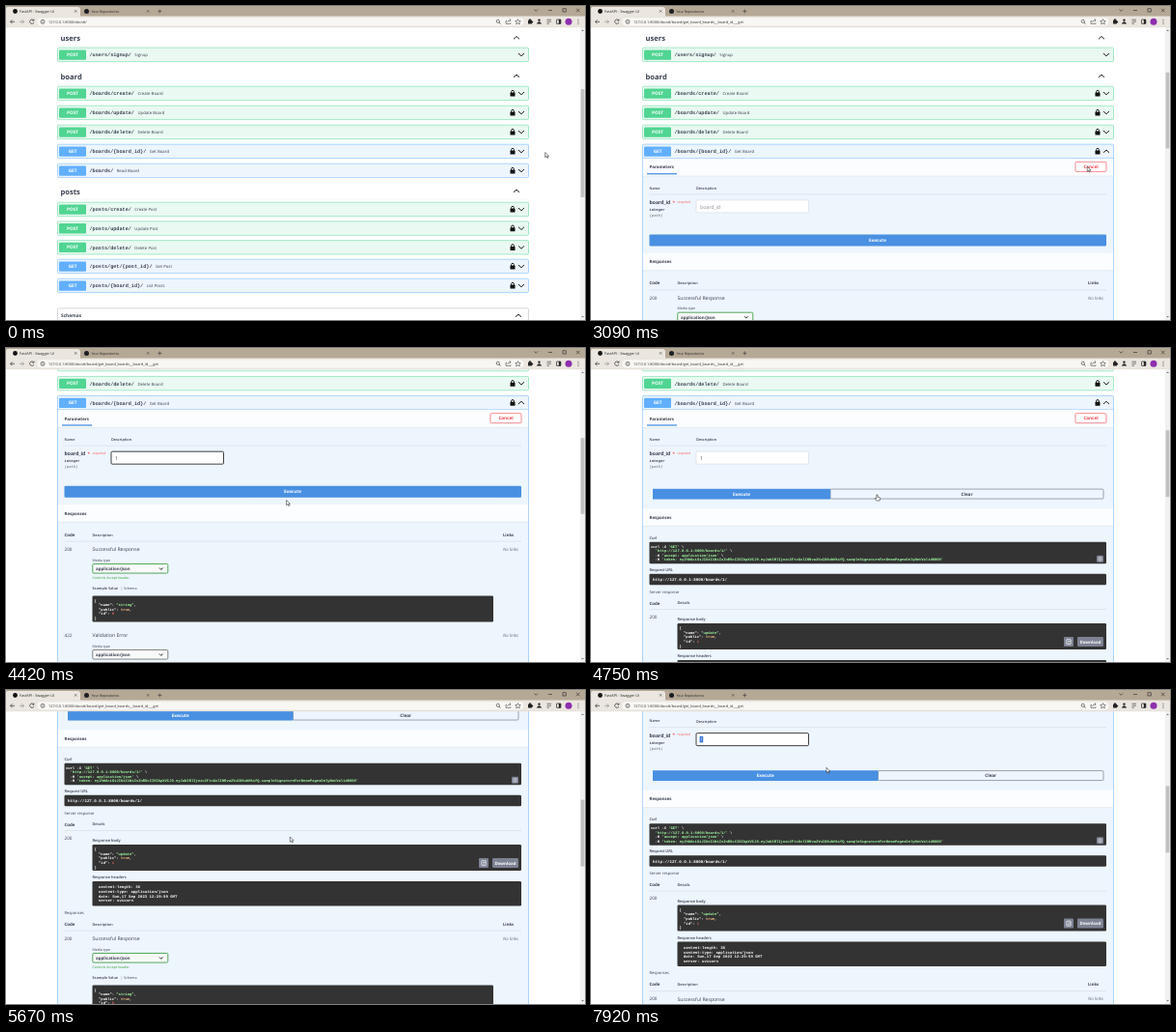
These frames come from a looping animation (600x325 px, 8000 ms). An HTML page:

```html
<!DOCTYPE html>
<html lang="en">
<head>
<meta charset="utf-8">
<title>API docs walkthrough</title>
<style>
  html, body { margin: 0; width: 100%; height: 100%; overflow: hidden; background: #fff; }
  svg { display: block; width: 600px; height: 325px; }
  text { font-family: "Open Sans", sans-serif; fill: #3b4151; text-rendering: geometricPrecision; white-space: pre; }
  .b { font-weight: 700; }
  .s { font-weight: 600; }
  .i { font-style: italic; }
  .m { font-family: "Liberation Mono", monospace; }
  .c { text-anchor: middle; }
  .w { fill: #fff; }
</style>
</head>
<body>
<svg id="stage" viewBox="0 0 600 325" xmlns="http://www.w3.org/2000/svg"></svg>
<script>
const LOOP = 8000;
const GREEN = '#50d592', BLUE = '#61affe', PANEL = '#edf5fd', INK = '#3b4151', DARK = '#333', BUTTON = '#4990e2';
const OPENED = 1750, TRYING = 3000, EXECUTED = 4635;

// Drawing helpers; text is placed by its vertical centre.
const text = (x, y, str, size, cls = '', fill = '') =>
  `<text x="${x}" y="${y + size * 0.36}" font-size="${size}" class="${cls}"${fill && ` style="fill:${fill}"`}>${str}</text>`;
const rect = (x, y, w, h, fill, stroke = 'none', r = 0, sw = 0.7) =>
  `<rect x="${x}" y="${y}" width="${w}" height="${h}" rx="${r}" fill="${fill}" stroke="${stroke}" stroke-width="${sw}"/>`;
const line = (d, stroke = INK, sw = 0.8) => `<path d="${d}" fill="none" stroke="${stroke}" stroke-width="${sw}"/>`;
const circle = (x, y, r, fill, stroke = 'none') =>
  `<circle cx="${x}" cy="${y}" r="${r}" fill="${fill}" stroke="${stroke}" stroke-width=".7"/>`;
const group = (id, body) => `<g id="${id}">${body}</g>`;
const named = (id, markup) => markup.replace(/^<(\w+)/, `<$1 id="${id}"`);
const rule = y => line(`M60.5 ${y}H534`, '#cdd4dc', 0.5);
const chevron = (x, y, up) => line(`M${x - 3} ${y + (up ? 1.4 : -1.4)}l3 ${up ? -2.8 : 2.8} 3 ${up ? 2.8 : -2.8}`, '#222', 1);
const tint = (color, str) => `<tspan style="fill:${color}">${str}</tspan>`;
const quoted = s => tint('#a2fca2', s);

function section(y, name) {
  return text(56.5, y, name, 7.6, 'b') + line(`M53 ${y + 8}H542`, '#eceef0', 0.5) + chevron(529, y - 0.5, true);
}

function summary(y, method, path, label, { lock = true, up = false } = {}) {
  const lockIcon = rect(522.5, y - 0.8, 5, 4, '#111', 'none', 0.6) + line(`M523.6 ${y - 0.5}v-1.2a1.4 1.4 0 0 1 2.8 0v1.2`, '#111', 0.9);
  return rect(55, y - 5, 28, 10.3, method === 'GET' ? BLUE : GREEN, 'none', 1)
    + text(69, y, method, 4.7, 'b c w')
    + text(86.5, y, path, 5.17, 'm s')
    + text(86.5 + path.length * 3.1 + 3.4, y + 0.5, label, 4.3)
    + (lock ? lockIcon : '') + chevron(534, y, up);
}

function row(y, method, path, label, options) {
  const get = method === 'GET';
  return rect(53.5, y - 7.2, 488, 14.4, get ? PANEL : '#eaf9f2', get ? BLUE : GREEN, 1.2, 0.5)
    + summary(y, method, path, label, options);
}

function band(y, label) {
  return rect(53.9, y - 9, 487.2, 18, '#fbfdff') + line(`M53.9 ${y + 9.2}H541.1`, '#d9e2ea', 0.6) + text(60.5, y, label, 4.4, 'b');
}

function button(x, y, w, label, stroke, color = stroke) {
  return rect(x, y - 5, w, 10, '#fff', stroke, 1.2, 0.6) + text(x + w / 2, y, label, 4.6, 'b c', color);
}

function copyIcon(x, y, s) {
  return rect(x, y, s, s, '#7d8293', 'none', 1)
    + `<g transform="translate(${x} ${y}) scale(${s / 10})">` + rect(2.8, 2.6, 4.4, 5, 'none', '#fff', 0.4) + line('M4 4.4H7M4 6H6', '#fff', 0.6) + '</g>';
}

const lines = (x, y, step, size, rows) =>
  rows.map(([dx, s], i) => text(x + dx, y + i * step, s, size, 'm b w')).join('');

function jsonLines(y, value, last) {
  return lines(91.5, y, 4.6, 3.8, [
    [0, '{'], [4.6, `"name": ${quoted(`"${value}"`)},`], [4.6, `"public": ${tint('#fcc28c', 'true')},`],
    [4.6, `"id": ${tint('#d36363', last)}`], [0, '}']]);
}

function pageTop() {
  return section(33, 'users')
    + row(50, 'POST', '/users/signup/', 'Signup', { lock: false })
    + section(72.5, 'board')
    + ['Create', 'Update', 'Delete'].map((verb, i) =>
        row(90 + i * 20, 'POST', `/boards/${verb.toLowerCase()}/`, `${verb} Board`)).join('');
}

function closedList() {
  return row(150, 'GET', '/boards/{board_id}/', 'Get Board')
    + row(170, 'GET', '/boards/', 'Read Board')
    + section(191.5, 'posts')
    + ['Create', 'Update', 'Delete'].map((verb, i) =>
        row(210 + i * 19.7, 'POST', `/posts/${verb.toLowerCase()}/`, `${verb} Post`)).join('')
    + row(269, 'GET', '/posts/get/{post_id}/', 'Get Post')
    + row(289, 'GET', '/posts/{board_id}/', 'List Posts')
    + rect(53.5, 312.5, 488, 30, '#fff', '#c4c6ca', 1.2)
    + text(57, 320, 'Schemas', 4.8, 'b') + chevron(531, 320, true);
}

function parameters() {
  return rect(53.5, 142.7, 488, 700, PANEL, BLUE, 1.2, 0.5)
    + summary(150, 'GET', '/boards/{board_id}/', 'Get Board', { up: true })
    + line('M53.5 157.2H541.5', BLUE, 0.5)
    + group('hoverCopy', copyIcon(508, 145.8, 8.5))
    + band(166.5, 'Parameters') + line('M58 173.3H89', BUTTON, 1.3)
    + group('tryButton', button(496, 166, 38, 'Try it out', '#8b8e97', INK))
    + group('cancelButton', button(502, 166, 32, 'Cancel', '#f0404a'))
    + text(60.5, 188, 'Name', 3.75, 's') + text(109, 188, 'Description', 3.8, 's') + rule(194.5)
    + text(60.5, 203, 'board_id', 5.1, 'b') + text(84.5, 202.5, '*', 4.5, '', '#f00') + text(89.5, 202, 'required', 3.4, '', '#f55')
    + text(60.5, 210, 'integer', 3.8, 'm b') + text(60.5, 216, '(path)', 3.9, 'm i', '#666')
    + '<rect id="field" x="109" y="200.5" width="116.5" height="13" rx="1.2"/>'
    + group('selection', rect(112.6, 203.8, 3.6, 6.4, '#3573d9'))
    + named('placeholder', text(113, 207.3, 'board_id', 5.2, '', '#8b8f98'))
    + named('typed', text(113, 207.3, '1', 5.2))
    + group('caret', line('M113 204V210.5', '#111', 0.5));
}

function response(y, code, label, selectStroke) {
  return text(60.5, y, code, 4.6) + text(89.5, y + 0.3, label, 5.1) + text(515, y, 'No links', 4.5, 'i', '#666b77')
    + text(89.5, y + 11.2, 'Media type', 3.6)
    + rect(89.8, y + 15.3, 78, 9.6, '#f9fafa', selectStroke, 1.2, 0.9) + text(93, y + 20.2, 'application/json', 4.4, 'b')
    + line(`M159 ${y + 19.4}l1.8 1.8 1.8-1.8`, '#111', 0.9);
}

function example(y) {
  return text(89.5, y, 'Example Value', 3.75, 's') + line(`M119.7 ${y - 2.2}v4.5`, '#aaa', 0.4) + text(122, y, 'Schema', 3.7)
    + rect(89.5, y + 7.6, 415.5, 27, DARK, 'none', 1.2);
}

function responseTable() {
  return text(60.5, 274, 'Code', 4.4, 'b') + text(89.5, 274.2, 'Description', 3.8, 's') + text(515, 274, 'Links', 4.2, 'b')
    + rule(281)
    + response(289, '200', 'Successful Response', '#41a047')
    + text(89.5, 318.8, 'Controls Accept header.', 3.5, '', '#2f9e2f')
    + example(329.7) + jsonLines(342, 'string', '0')
    + response(378, '422', 'Validation Error', '#777') + example(412);
}

function result() {
  const token = 'eyJhbGciOiJIUzI1NiIsInR5cCI6IkpXVCJ9.' + 'eyJub3RlIjoic2FtcGxlIHRva2VuIG9ubHkifQ.' + 'sampleSignatureForDemoPagesOnlyNotValid0000';
  return named('clearBox', rect(64, 241, 467, 10, 'none', '#666b77', 1.2, 0.6))
    + named('clearText', text(388, 246, 'Clear', 4.6, 'b c'))
    + named('runBox', rect(64, 240.7, 183, 10.8, BUTTON))
    + named('runText', text(155, 246, 'Execute', 4.6, 'b c w'))
    + band(270, 'Responses')
    + text(60.5, 291.3, 'Curl', 4, 's') + rect(60.5, 295.6, 473.5, 22.6, DARK, 'none', 1.2)
    + lines(62, 300.3, 4.55, 3.8, [
        [0, `curl -X ${quoted("'GET'")} \\`],
        [4.6, `${quoted("'http://127.0.0.1:8000/boards/1/'")} \\`],
        [4.6, `-H ${quoted("'accept: application/json'")} \\`],
        [4.6, `-H ${quoted(`'token: ${token}'`)}`]])
    + copyIcon(524, 309.7, 7)
    + text(60.5, 324.3, 'Request URL', 4, 's') + rect(60.5, 328.8, 473.5, 11.4, DARK, 'none', 1.2)
    + text(64, 334.5, 'http://127.0.0.1:8000/boards/1/', 4.15, 'm b w')
    + text(60.5, 347, 'Server response', 4.1)
    + text(60.5, 359, 'Code', 4.4, 'b') + text(89.5, 359, 'Details', 3.9, 's') + rule(365.5)
    + text(60.5, 373, '200', 4.6) + text(89.5, 376, 'Response body', 4, 's')
    + rect(89.5, 380, 444.5, 27, DARK, 'none', 1.2) + jsonLines(384.8, 'update', '1')
    + copyIcon(490, 394, 10) + rect(504, 394, 27, 10, '#7d8293', 'none', 1.2) + text(517.5, 399, 'Download', 4.4, 'b c w')
    + text(89.5, 413.8, 'Response headers', 4, 's') + rect(89.5, 418, 444.5, 25.4, DARK, 'none', 1.2)
    + lines(95.8, 424, 4.55, 4, ['content-length: 38', 'content-type: application/json',
        'date: Sun,17 Sep 2023 12:29:59 GMT', 'server: uvicorn'].map(s => [0, s]))
    + text(60.5, 450.4, 'Responses', 4.1);
}

function browserBar() {
  const ink = '#454545', bar = '#ebe6df';
  return rect(0, 0, 600, 11, '#b5a895')
    + `<path d="M0 11V2.5Q0 1 2 1H74Q77 1 77 4V11Z" fill="${bar}"/>` + rect(0, 10.5, 600, 11.5, bar)
    + circle(9.5, 5.5, 2.4, '#111') + text(14, 5.5, 'FastAPI - Swagger UI', 3.8, '', '#222') + line('M71 4.2l2.4 2.4m0-2.4l-2.4 2.4', ink, 0.6)
    + circle(83.5, 5.5, 2.5, '#1b1f23') + text(88.5, 5.5, 'Your Repositories', 3.5, '', '#222') + line('M146 4.2l2.4 2.4m0-2.4l-2.4 2.4', ink, 0.6)
    + line('M157.3 5.4h4M159.3 3.4v4', ink, 0.7)
    + line('M547.5 3.5l1.8 1.8 1.8-1.8M562 4.5h4M591 2.8l3.4 3.4m0-3.4l-3.4 3.4', '#222', 0.6) + rect(577, 2.8, 3.2, 3.2, 'none', '#222', 0, 0.6)
    + line('M9 16.3H4.5m2-2l-2 2 2 2', ink) + line('M14 16.3h4.5m-2-2l2 2-2 2', '#999')
    + line('M28.6 14.8a2.2 2.2 0 1 0 .3 2.2M29 13.6v1.6h-1.7', ink)
    + rect(32.5, 12.2, 504, 8.2, '#f9f7f4', 'none', 4.1)
    + circle(38, 16.3, 2, 'none', ink) + line('M38 16v1.4M38 14.9v.6', ink, 0.6)
    + named('address', text(44, 16.2, '', 3.85, '', '#333'))
    + circle(509.8, 15.8, 1.6, 'none', ink) + line('M511 17l1.5 1.5', ink)
    + line('M519 15.2h-1v3.2h5v-1M519.5 17q.5-2.4 3.5-2.4m-1.2-1.3l1.4 1.3-1.4 1.3', ink, 0.6)
    + line('M530.5 13.6l.8 1.8 2 .2-1.5 1.3.5 2-1.8-1.1-1.8 1.1.5-2-1.5-1.3 2-.2z', ink, 0.6)
    + rect(541, 14.6, 4, 4, '#222', 'none', 0.6) + circle(543, 14.3, 1, '#222') + circle(545.2, 16.6, 1, '#222')
    + circle(552.5, 14.6, 1.2, '#222') + '<path d="M549.8 18.6q2.7-4.6 5.4 0z" fill="#222"/>'
    + line('M560.5 14.2h4.5M560.5 16.2h4.5M560.5 18.2h2.5', ink, 0.7)
    + rect(570.5, 14, 4.4, 4.4, 'none', '#222', 0.4) + rect(572.8, 14, 2.1, 4.4, '#222')
    + circle(583, 16.3, 3.5, '#8e2fae')
    + [14.3, 16.3, 18.3].map(y => circle(593, y, 0.55, ink)).join('')
    + line('M0 21.8H600', '#dcd8d2', 0.5);
}

const scrollbar = rect(595, 22, 5, 303, '#f1f1f1') + '<rect id="thumb" x="595.6" width="3.8" fill="#c1c1c1"/>'
  + '<path d="M596.2 26l1.4-1.6 1.4 1.6zM596.2 321l1.4 1.6 1.4-1.6z" fill="#777"/>';

const pointers = group('arrow', '<path d="M0 0V5.2L1.3 4.1 2.2 6 3 5.6 2.2 3.8H3.8Z" fill="#fff" stroke="#111" stroke-width=".5"/>')
  + group('hand', '<path d="M-.6 0Q0-.6.6 0V2.2L2.8 2.8Q3.3 3 3.1 4L2.6 6H-.6L-2.2 3.6Q-1.6 2.8-.6 3.6Z" fill="#fff" stroke="#111" stroke-width=".5"/>')
  + group('beam', line('M-1-2.5h2M0-2.5v5M-1 2.5h2', '#111', 0.5));

document.getElementById('stage').innerHTML = rect(0, 0, 600, 325, '#fff')
  + group('page', pageTop() + group('closed', closedList())
    + group('open', parameters()
      + group('idleHead', band(252, 'Responses'))
      + group('tryHead', rect(60.5, 236, 473.5, 12, BUTTON, 'none', 1.2) + text(297, 242, 'Execute', 4.6, 'b c w') + band(264.3, 'Responses'))
      + group('result', result())
      + group('table', responseTable())))
  + scrollbar + browserBar() + group('cursor', pointers);

const el = Object.fromEntries([...document.querySelectorAll('[id]')].map(n => [n.id, n]));
const show = (id, on) => { el[id].style.display = on ? '' : 'none'; };
const set = (id, attrs) => { for (const k in attrs) el[id].setAttribute(k, attrs[k]); };
const shift = (id, y, x = 0) => set(id, { transform: `translate(${x} ${y})` });
const clamp = p => Math.min(1, Math.max(0, p));
const inOut = p => p < 0.5 ? 2 * p * p : 1 - 2 * (1 - p) ** 2;

// [start, end, wheel notches]
const NOTCH = 31.25;
const SCROLLS = [[3750, 3956, 3], [4800, 5000, 4], [6400, 6618, -2]];
// [time, x, y, pointer shape from then on]
const MOVES = [
  [0, 558.7, 151.5, 'arrow'], [700, 558.7, 151.5, 'arrow'], [1400, 533.5, 150, 'hand'], [2300, 533.5, 150, 'hand'],
  [2850, 515, 166, 'hand'], [3080, 515, 166, 'arrow'], [3380, 239, 206.7, 'beam'], [3800, 239, 206.7, 'hand'],
  [4150, 239, 206.7, 'arrow'], [4500, 296.5, 152, 'hand'], [4830, 296.5, 152, 'arrow'], [5000, 294.3, 152, 'arrow'],
  [5950, 294.3, 152, 'arrow'], [6400, 254.8, 150.7, 'arrow'], [6750, 254.8, 150.7, 'arrow'], [7150, 140, 51, 'beam'],
  [7350, 140, 51, 'beam'], [7500, 112, 51, 'beam'], [7590, 112, 51, 'arrow'], [7900, 244, 80.3, 'arrow'], [LOOP, 244, 80.3, 'arrow']];

function pointerAt(t) {
  const i = MOVES.findIndex((m, n) => t < MOVES[n + 1][0]);
  const [t0, x0, y0, shape] = MOVES[i], [t1, x1, y1] = MOVES[i + 1];
  const p = inOut((t - t0) / (t1 - t0));
  return { x: x0 + (x1 - x0) * p, y: y0 + (y1 - y0) * p, shape };
}

function draw(t) {
  const opened = t >= OPENED, trying = t >= TRYING, executed = t >= EXECUTED;
  const scroll = NOTCH * SCROLLS.reduce((sum, [a, b, n]) => sum + n * inOut(clamp((t - a) / (b - a))), 0);
  shift('page', 0.4 - scroll);

  show('closed', !opened);
  show('open', opened);
  show('hoverCopy', t < 2500);
  show('tryButton', !trying);
  show('cancelButton', trying);
  show('idleHead', !trying);
  show('tryHead', trying && !executed);
  show('result', executed);
  shift('result', -1.6);
  shift('table', executed ? 186.5 : trying ? 12.5 : 0);
  el.address.textContent = '127.0.0.1:8000/docs#/' + (opened ? 'board/get_board_boards__board_id___get' : '');

  const focused = (t >= 3400 && t < EXECUTED) || t >= 7250;
  const typed = t >= 4250, selected = t >= 7500;
  set('field', { fill: trying ? '#fff' : '#f5f8fa', stroke: focused ? '#2b2b2b' : '#d4d8dd', 'stroke-width': focused ? 0.9 : 0.6 });
  show('placeholder', !typed);
  show('typed', typed);
  el.typed.style.fill = selected ? '#fff' : INK;
  show('selection', selected);
  show('caret', focused && !typed);

  // The Execute button grows from its label until both halves are equal.
  const grow = 1 - (1 - clamp((t - EXECUTED) / 300)) ** 2.15;
  const width = Math.max(24, 467 * grow / (1 + grow));
  set('runBox', { width });
  set('runText', { x: 64 + width / 2 });
  set('clearBox', { x: 64 + width, width: 467 - width });
  set('clearText', { x: 64 + width + (467 - width) / 2 });

  const height = executed ? 1273 : trying ? 1117 : opened ? 1098 : 785;
  set('thumb', { y: 28 + (157 + scroll) / height * 290, height: 303 / height * 290 });

  const { x, y, shape } = pointerAt(t);
  shift('cursor', y, x);
  for (const id of ['arrow', 'hand', 'beam']) show(id, id === shape);
}

function tick() {
  draw(performance.now() % LOOP);
  requestAnimationFrame(tick);
}
tick();
</script>
</body>
</html>
```
